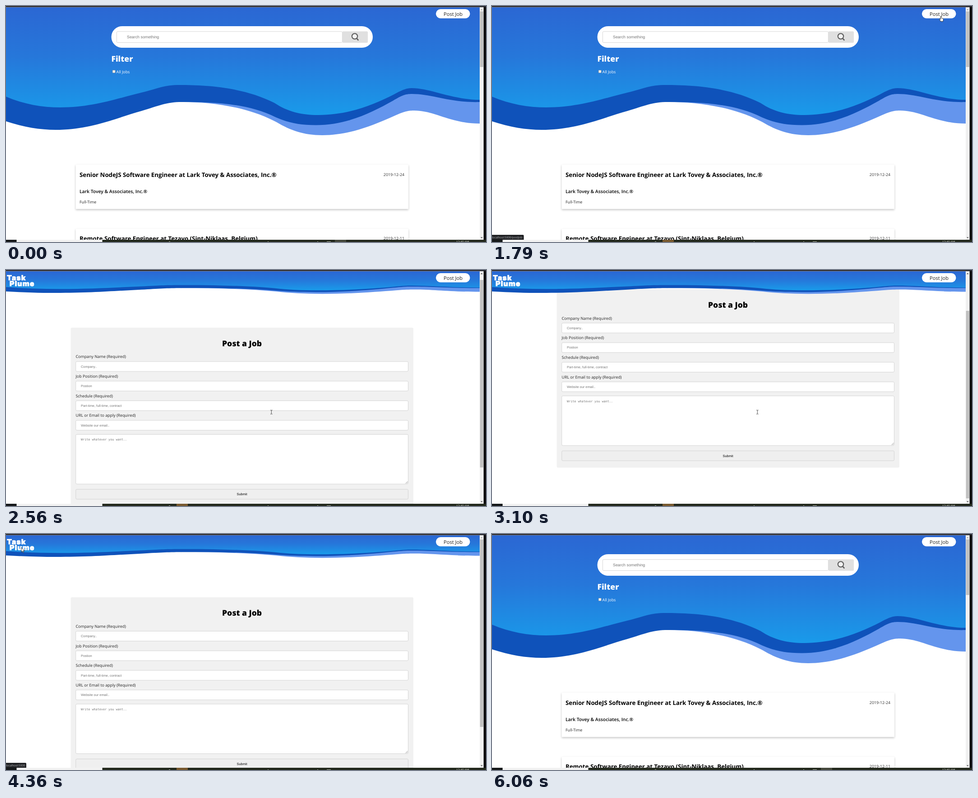
Write an HTML page that moves like this. It is 1064 px wide and 526 px high and loops after 6130 ms.

```html
<!DOCTYPE html>
<html lang="en">
<head>
<meta charset="utf-8">
<title>Job board</title>
<style>
  html, body { margin: 0; width: 100%; height: 100%; overflow: hidden; background: #fff; }
  svg { display: block; width: 100%; height: 100%; }
  text { font: 8.85px "Open Sans", "Noto Sans", sans-serif; text-rendering: geometricPrecision; white-space: pre; }
  .h1 { font-weight: 800; font-size: 17.5px; }
  .h2 { font-weight: 700; font-size: 13.28px; }
  .h3 { font-weight: 600; font-size: 10.36px; }
  .logo { font: 900 16px Inter, "Open Sans", sans-serif; letter-spacing: 1px; fill: #fff; stroke: #fff; stroke-width: .7; }
  .btn { font-size: 11.1px; fill: #222; }
  .arial { font-family: "Liberation Sans", Arial, sans-serif; }
  .small { font-size: 7.4px; }
  .mono { font: 6.78px "DejaVu Sans Mono", monospace; }
  .hint { fill: #757575; }
  .end { text-anchor: end; fill: #333; }
  .mid { text-anchor: middle; }
  .box { fill: #fff; stroke: #ccc; stroke-width: .8; }
  .card { fill: #fff; filter: drop-shadow(0 2.2px 2.2px rgba(0, 0, 0, .24)); }
</style>
</head>
<body>
<svg viewBox="0 0 1064 526" preserveAspectRatio="none">
  <defs>
    <linearGradient id="sky" gradientUnits="userSpaceOnUse" x1="0" y1="3" x2="0" y2="245">
      <stop offset="0" stop-color="#2b67d3"/>
      <stop offset=".45" stop-color="#2677da"/>
      <stop offset="1" stop-color="#199bea"/>
    </linearGradient>
    <clipPath id="view"><rect y="2.5" width="1050" height="518.5"/></clipPath>
    <g id="waves">
      <path fill="#6495ed" d="M385 214C445 213 530 222 600 259C630 277 660 288 701 288C765 288 820 263 865 243C885 234 893 233 905 233C950 233 985 262 1050 262V170H500Z"/>
      <path fill="#0f52ba" d="M0 257C40 270 75 276 110 276C190 276 245 249 300 234C340 222 355 214 390 214C455 214 535 216 598 248C625 260 650 265.5 687 265.5C755 265.5 810 238 858 211C878 199 885 196 900 196C945 196 985 216 1050 214V160H0Z"/>
      <path fill="url(#sky)" d="M0 202C40 219 80 226 120 226C190 226 240 208 300 193C340 183 350 176 385 176C440 176 525 180 595 216C625 236 655 243 692 243C760 243 815 220 860 197C880 186 888 183 900 183C940 183 990 209 1050 209V3H0Z"/>
    </g>
  </defs>

  <rect width="1064" height="526" fill="#fff"/>

  <g id="home" clip-path="url(#view)">
    <use href="#waves"/>
    <rect x="233.5" y="45" width="579.5" height="48" rx="24" fill="#fff"/>
    <rect class="box" x="245.4" y="56.9" width="500" height="24.6" rx="2"/>
    <text class="arial hint" x="268" y="72">Search something</text>
    <rect x="745.5" y="56.5" width="56.5" height="25.5" rx="2" fill="#e0e0e0"/>
    <g fill="none" stroke="#5f5f5f">
      <circle cx="773" cy="67.5" r="6.2" stroke-width="2.2" fill="#f2f2f2"/>
      <path d="M777.4 72.2L781.2 76.6" stroke-width="2.6"/>
    </g>
    <text class="h1" x="233.5" y="123.8" fill="#fff">Filter</text>
    <rect x="236.2" y="143" width="6" height="6" rx=".8" fill="#efefef" stroke="#8a8a8a" stroke-width=".6"/>
    <text x="244.6" y="149.6" fill="#fff">All Jobs</text>

    <rect class="card" x="154.5" y="353.5" width="737.5" height="99" rx="1"/>
    <text class="h2" x="163" y="380.6">Senior NodeJS Software Engineer at Lark Tovey &amp; Associates, Inc.®</text>
    <text class="end" x="883" y="379">2019-12-24</text>
    <text class="h3" x="163" y="416.6">Lark Tovey &amp; Associates, Inc.®</text>
    <text x="163" y="439.6" fill="#222">Full-Time</text>
    <rect class="card" x="154.5" y="496.5" width="737.5" height="99" rx="1"/>
    <text class="h2" x="163" y="523.2">Remote Software Engineer at Tezavo (Sint-Niklaas, Belgium)</text>
    <text class="end" x="883" y="521.4">2019-12-11</text>
  </g>

  <g id="post" clip-path="url(#view)">
    <g id="form">
      <rect x="143.5" y="141" width="759.5" height="398" rx="3" fill="#f1f1f1"/>
      <text class="h1 mid" x="523" y="182.4">Post a Job</text>
      <g id="fields"></g>
      <rect class="box" x="154.7" y="379" width="736.8" height="110.6" rx="2.4"/>
      <text class="mono hint" x="166" y="393">Write whatever you want..</text>
      <path d="M885.5 488.5L890.5 483.5M888 488.5L890.5 486" stroke="#777" stroke-width=".7"/>
      <rect class="box" x="154.7" y="501.4" width="736.8" height="22" rx="2.4" style="fill:#efefef"/>
      <text class="arial small mid" x="523" y="515">Submit</text>
    </g>
    <use href="#waves" transform="translate(0 3) scale(1 .176) translate(0 -3)"/>
    <text class="logo" x="2" y="22.6">Task</text>
    <text class="logo" x="8" y="36">Plume</text>
  </g>

  <rect x="953" y="7" width="75.5" height="20.5" rx="10.2" fill="#fff"/>
  <text class="btn mid" x="991" y="21.6">Post Job</text>

  <g id="status">
    <path id="tip" fill="#202124"/>
    <text id="link" x="0" y="517.8" fill="#b8bbbe" style="font-size:6.3px"></text>
  </g>

  <rect x="1050" y="2" width="9" height="520" fill="#f1f1f1"/>
  <rect id="thumb" x="1050.7" width="7.3" fill="#c1c1c1"/>
  <path id="up" d="M1051.9 9.2L1054.3 6.6L1056.7 9.2Z"/>
  <path d="M1051.9 515.2L1054.3 517.8L1056.7 515.2Z" fill="#505050"/>
  <rect x="1058.7" width="5.3" height="526" fill="#0c0c0e"/>
  <rect width="1064" height="2.6" fill="#26272d"/>

  <g>
    <rect y="521" width="1064" height="5" fill="#23291d"/>
    <rect y="521" width="23.5" height="5" fill="#15181a"/>
    <rect x="23.5" y="521" width="190" height="5" fill="#f2f2f2"/>
    <rect id="task" y="521" width="25" height="5"/>
    <path d="M361 525.5h3M580 525.5h2M690 525.5h2M711 525.3h9" stroke="#b9bcae" stroke-width="1"/>
    <text x="998" y="528" fill="#fff" style="font-size:6.5px">12:40 AM</text>
  </g>

  <g id="cursor" stroke-linejoin="round">
    <path id="arrow" fill="#fff" stroke="#111" stroke-width=".8" d="M0 0V10.2L2.3 8.1L3.8 11.6L5.4 10.9L3.9 7.5H7Z"/>
    <path id="hand" fill="#fff" stroke="#111" stroke-width=".8" d="M0 .8Q.9 -.5 1.8 .8V4.4L5.3 5.1Q6.4 5.5 6.3 7V9.5L5.5 12H1L-2 8.2Q-2.6 6.6 -1.5 6.6L0 7.6Z"/>
    <path id="beam" fill="none" stroke="#222" stroke-width=".8" d="M-2 -4.2H-.5L.3 -3.7L1.1 -4.2H2.6M.3 -3.7V4M-2 4.6H-.5L.3 4L1.1 4.6H2.6"/>
  </g>
</svg>
<script>
const LOOP = 6130;
const $ = id => document.getElementById(id);
const show = (id, on) => { $(id).style.display = on ? "" : "none"; };
const set = (id, attrs) => { for (const k in attrs) $(id).setAttribute(k, attrs[k]); };

$("fields").innerHTML = [
  ["Company Name (Required)", "Company.."],
  ["Job Position (Required)", "Postion"],
  ["Schedule (Required)", "Part-time, full-time, contract"],
  ["URL or Email to apply (Required)", "Website our email.."]
].map(([label, hint], i) => {
  const y = 216.6 + i * 43.7;
  return `<text x="154.5" y="${y - 7.6}" fill="#222">${label}</text>
    <rect class="box" x="154.7" y="${y}" width="736.8" height="22" rx="2.4"/>
    <text class="arial small hint" x="166" y="${y + 13.6}">${hint}</text>`;
}).join("");

// Each row holds from its time until the next row.
const pages = [[0, "home"], [1810, "post"], [4450, "home"]];
const links = [[0, ""], [1740, "localhost:5000/postJob"], [2410, ""], [4360, "localhost:5000"], [4600, ""]];
const tasks = [[0, 729, "#45483c"], [1600, 378, "#78592f"], [5980, 729, "#45483c"]];
const scrolls = [
  [0, 0], [2560, 12.6], [2640, 44], [2720, 75], [2800, 93], [2880, 98.4],
  [3170, 86], [3250, 53], [3330, 22], [3400, 5], [3480, 0]
];

// Cursor glides: shape, step times, then the points of a path.
const steps = (from, to, n) => Array.from({ length: n }, (_, i) => from + (to - from) * i / (n - 1));
const along = (pts, u) => {
  const s = u * (pts.length - 1), i = Math.min(Math.floor(s), pts.length - 2);
  return [0, 1].map(k => pts[i][k] + (pts[i + 1][k] - pts[i][k]) * (s - i));
};
const glide = (shape, from, to, n, ...pts) =>
  steps(from, to, n).map((t, i) => [t, shape, ...along(pts, n > 1 ? i / (n - 1) : 0)]);

const moves = [
  [0, "", 0, 0],
  ...glide("arrow", 380, 620, 4, [985, 171], [870, 270], [680, 410], [534, 499]),
  ...glide("arrow", 1020, 1320, 5, [560, 478], [710, 335], [885, 180], [985, 90], [1005.5, 37.5]),
  ...glide("arrow", 1400, 1600, 3, [1005, 33], [1002, 29], [999, 25]),
  [1670, "hand", 994, 22.5],
  ...glide("arrow", 2030, 2100, 2, [980, 42], [900, 110]),
  ...glide("beam", 2180, 2330, 3, [730, 228], [628, 300], [588, 316.5]),
  [3330, "beam", 540, 270],
  ...glide("arrow", 3400, 3480, 2, [455, 160], [397, 107]),
  ...glide("arrow", 3650, 3970, 5, [370, 98], [290, 76], [190, 52], [100, 28], [50, 17.5]),
  ...glide("arrow", 4040, 4190, 3, [26, 20], [29, 26], [34, 30]),
  ...glide("arrow", 4520, 4830, 5, [60, 40], [300, 100], [620, 150], [900, 180], [1045, 192]),
  [4900, "", 0, 0]
];

const at = (rows, t) => {
  let row = rows[0];
  for (const r of rows) if (r[0] <= t + .01) row = r;
  return row;
};

function draw(t) {
  const page = at(pages, t)[1], home = page === "home";
  show("home", home);
  show("post", !home);

  const y = home ? 0 : at(scrolls, t)[1];
  set("form", { transform: `translate(0 ${-y})` });
  set("thumb", { y: 12 + y * .803, height: home ? 124 : 418 });
  set("up", { fill: y ? "#505050" : "#a3a3a3" });

  const link = at(links, t)[1], w = link.length > 14 ? 70.5 : 45;
  show("status", link);
  $("link").textContent = link;
  set("tip", { d: `M0 510H${w - 2}Q${w} 510 ${w} 512V521H0Z` });

  const [, x, fill] = at(tasks, t);
  set("task", { x, fill });

  const [, shape, cx, cy] = at(moves, t);
  for (const id of ["arrow", "hand", "beam"]) show(id, id === shape);
  set("cursor", { transform: `translate(${cx} ${cy})` });
}

const start = performance.now();
function tick() {
  draw((performance.now() - start) % LOOP);
  requestAnimationFrame(tick);
}
tick();
</script>
</body>
</html>
```
